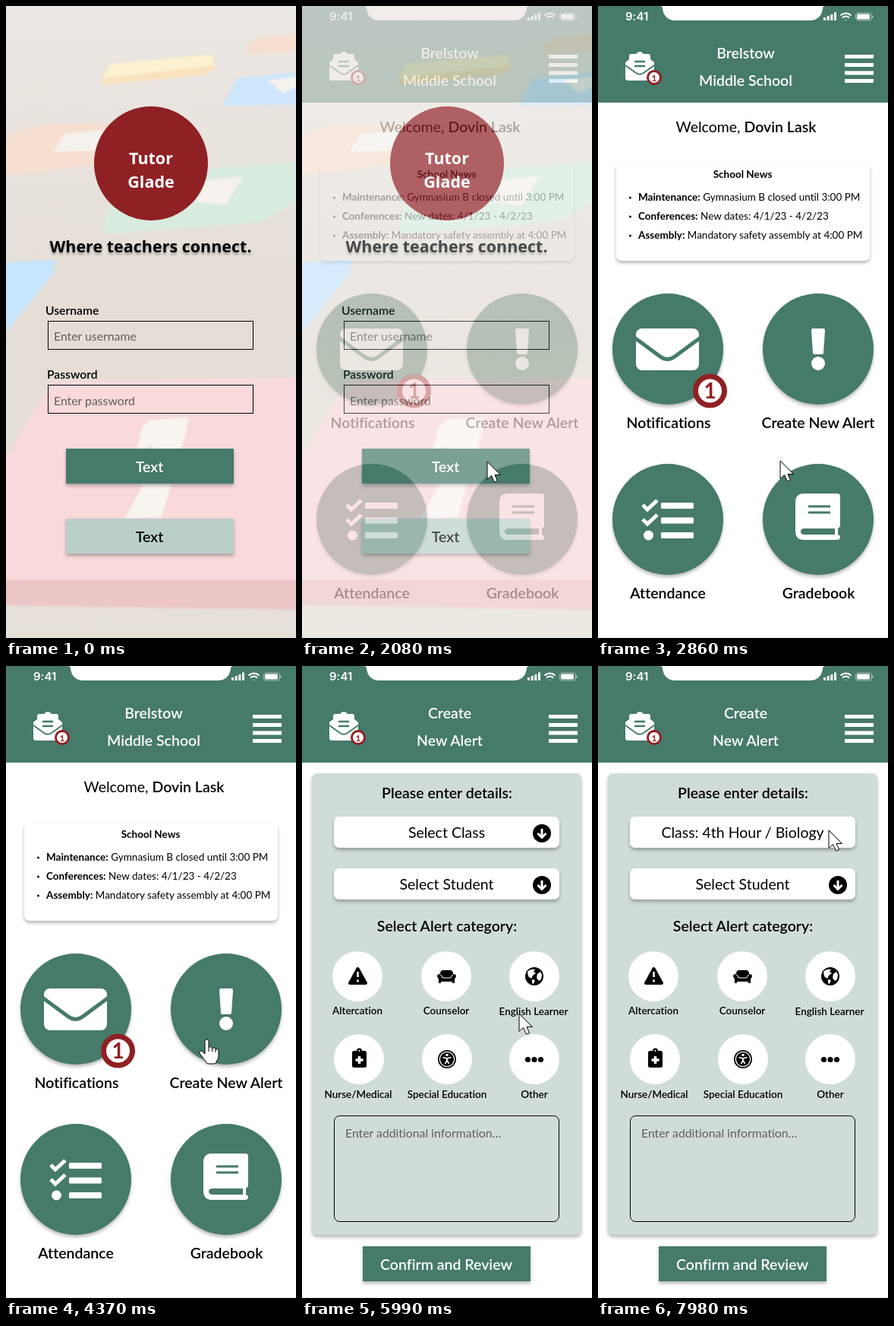
An HTML page that plays this animation: 382x831 px, repeating every 8 s.

```html
<!DOCTYPE html>
<html lang="en">
<head>
<meta charset="utf-8">
<title>School app walkthrough</title>
<style>
  html, body { margin: 0; width: 100%; height: 100%; overflow: hidden; background: #fff; }
  svg { display: block; width: 100vw; height: 100vh; }
  text { font-family: Lato, "Open Sans", sans-serif; font-size: 13.5px; font-variant-ligatures: none; }
  .mid { text-anchor: middle; }
  .semi { font-weight: 600; }
  .bold { font-weight: 700; }
  .big { font-size: 19.5px; }
  .brand { font-family: "Open Sans", "Noto Sans", sans-serif; font-size: 21.5px; font-weight: 700; }
  .field { font-size: 15.7px; }
  .hint { font-size: 15.8px; fill: #625e5c; }
  .time { font-family: Inter, sans-serif; font-size: 15px; font-weight: 600; }
  .green { fill: #467a6a; }
  .white { fill: #fff; }
  .red { fill: #8f2023; }
  .box { fill: none; stroke: #000; }
  .cut { fill: none; stroke: #467a6a; }
  .raised { filter: drop-shadow(0 3px 2px rgba(0, 0, 0, .28)); }
</style>
</head>
<body>
<svg viewBox="0 0 382 831" preserveAspectRatio="none">
  <defs>
    <linearGradient id="ground" x2="0" y2="1">
      <stop stop-color="#ebe7e3"/>
      <stop offset=".5" stop-color="#e4ddd6"/>
      <stop offset="1" stop-color="#e5e0d8"/>
    </linearGradient>
    <filter id="soft"><feGaussianBlur stdDeviation="1.2"/></filter>

    <g id="top">
      <rect class="green" width="382" height="127"/>
      <path class="white" d="M81 0Q85 0 85 3C86 13 92 19 102 19H279C289 19 295 13 296 3Q296 0 300 0Z"/>
      <g class="white">
        <text class="time" x="36" y="19">9:41</text>
        <path d="M297 15h3v4h-3zM301.700 13h3v6h-3zM306.300 11h3v8h-3zM311 8.500h3v10.500h-3z"/>
        <rect x="341" y="10.500" width="17" height="7" rx="1.500"/>
        <path d="M361.500 12v4q2-2 0-4"/>
        <path d="M36 74L50 63Q55 57 60 63L74 74V95Q74 98 70 98H40Q36 98 36 95Z"/>
        <rect x="41" y="63" width="28" height="22" rx="3"/>
        <path d="M325 64h38v5h-38zM325 75h38v5h-38zM325 85.500h38v5h-38zM325 96h38v5h-38z"/>
      </g>
      <g fill="none" stroke="#fff">
        <rect x="339.500" y="9" width="21" height="10" rx="3" opacity=".5"/>
        <path d="M319.500 12.500Q326.500 6.500 333.500 12.500M322 15.500Q326.500 11.500 331 15.500" stroke-width="2"/>
        <path d="M326.500 18v.5" stroke-width="3"/>
      </g>
      <path class="cut" stroke-width="2" d="M36 78L50 88Q55 91.500 60 88L74 78"/>
      <path class="cut" stroke-width="2.500" d="M48 73H62M48 79H62"/>
      <circle cx="74" cy="94" r="8.500" fill="#fff" stroke="#8f2023" stroke-width="3"/>
      <text class="mid bold red" x="74" y="98.500" style="font-size:12px">1</text>
    </g>
    <g id="down">
      <circle r="12"/>
      <path d="M0-6V5M-5.500 0L0 5.500L5.500 0" fill="none" stroke="#fff" stroke-width="3"/>
    </g>
  </defs>

  <g id="login">
    <rect width="382" height="831" fill="url(#ground)"/>
    <g filter="url(#soft)">
      <path fill="#f9e2bd" d="M127 86L275 74V82L262 90L128 104Z"/>
      <path fill="#fcf1d0" d="M137 76L272 64L274 78L128 95Z"/>
      <path fill="#f6dfd0" d="M317 52L332 42L385 36V58L318 65ZM-5 172L45 156L160 155L135 207L-5 223Z"/>
      <path fill="#cde6fb" d="M304 95L385 87V129L285 132Z"/>
      <path fill="#d8ebdf" d="M150 222L385 205V256L335 284L130 300V281Z"/>
      <path fill="#c6e5fd" d="M-5 337L66 334L62 352L-5 435Z"/>
      <path fill="#f5f2ee" d="M78 168L130 163L118 190L62 192ZM345 98L385 92V104L365 115ZM265 229L312 224L290 262L250 258Z"/>
      <path fill="#f9d9db" d="M62 492L385 489V758H-5V602Z"/>
      <path fill="#ecc6c7" d="M-5 754H385V794L-5 788Z"/>
      <path fill="#f8f4f0" d="M180 553L191 544L241 541L237 560L205 672L157 674L180 630L194 578L172 584Z"/>
    </g>
    <circle class="red" cx="191" cy="207" r="75"/>
    <g class="mid">
      <text class="white brand" x="191" y="208">Tutor</text>
      <text class="white brand" x="191" y="239">Glade</text>
      <text class="brand" x="190.500" y="324" style="text-shadow:0 3px 3px rgba(0,0,0,.3)">Where teachers connect.</text>
    </g>
    <text class="field semi" x="52" y="406">Username</text>
    <text class="field semi" x="54" y="490">Password</text>
    <rect class="box" x="55.500" y="414.500" width="270" height="37"/>
    <rect class="box" x="55.500" y="498.500" width="270" height="37"/>
    <text class="hint" x="63" y="440">Enter username</text>
    <text class="hint" x="63" y="525">Enter password</text>
    <rect class="green raised" x="79" y="582" width="221" height="46"/>
    <rect class="raised" x="79" y="674" width="221" height="46" fill="#bcd0ca"/>
    <g class="mid semi">
      <text class="big white" x="189" y="613">Text</text>
      <text class="big" x="189" y="705">Text</text>
    </g>
  </g>

  <g id="home">
    <rect class="white" width="382" height="831"/>
    <rect y="830" width="382" height="1" fill="#eee"/>
    <use href="#top"/>
    <g class="mid semi white">
      <text class="big" x="194.500" y="69">Brelstow</text>
      <text class="big" x="194.500" y="105">Middle School</text>
    </g>
    <text class="big mid" x="195" y="166">Welcome, <tspan class="semi">Dovin Lask</tspan></text>
    <rect class="white raised" x="24" y="206" width="334" height="129" rx="7"/>
    <text class="mid bold" x="190.500" y="226">School News</text>
    <circle cx="42.500" cy="252" r="1.500"/>
    <circle cx="42.500" cy="277" r="1.500"/>
    <circle cx="42.500" cy="302" r="1.500"/>
    <text x="53" y="256"><tspan class="bold">Maintenance:</tspan> Gymnasium B closed until 3:00 PM</text>
    <text x="53" y="281"><tspan class="bold">Conferences:</tspan> New dates: 4/1/23 - 4/2/23</text>
    <text x="53" y="306"><tspan class="bold">Assembly:</tspan> Mandatory safety assembly at 4:00 PM</text>

    <g class="green raised">
      <circle cx="92" cy="451" r="73"/>
      <circle cx="290" cy="451" r="73"/>
      <circle cx="92" cy="675" r="73"/>
      <circle cx="290" cy="675" r="73"/>
    </g>
    <g class="white">
      <rect x="50" y="424" width="83" height="55" rx="8"/>
      <path d="M283 424H297Q299 424 299 427L297 456Q297 458 295 458H285Q283 458 283 456L281 427Q281 424 283 424Z"/>
      <circle cx="290" cy="470" r="9"/>
      <circle cx="66.500" cy="696" r="6.500"/>
      <rect x="83" y="653" width="43" height="8" rx="1.500"/>
      <rect x="83" y="672.500" width="43" height="8" rx="1.500"/>
      <rect x="83" y="692" width="43" height="8" rx="1.500"/>
      <path d="M271 641H315Q319 641 319 645V683Q319 685 316 687V695Q319 696 319 698Q319 702 315 702H271Q260 702 260 690V653Q260 641 271 641Z"/>
    </g>
    <path class="cut" stroke-width="5" d="M48 436L82 461Q91.500 468 101 461L135 436"/>
    <path class="cut" stroke-width="3" d="M277 658H306M277 666H306"/>
    <path class="green" d="M271 687H312V695H271Q267 694.500 267 691T271 687Z"/>
    <path fill="none" stroke="#fff" stroke-width="5" d="M59 656L65 662L78 650M59 675L65 681L78 669"/>
    <circle cx="147.500" cy="506" r="19" fill="#fff" stroke="#8f2023" stroke-width="7"/>
    <text class="mid bold red" x="147.500" y="516" style="font-size:28px">1</text>
    <g class="mid semi">
      <text class="big" x="93" y="555">Notifications</text>
      <text class="big" x="290" y="555">Create New Alert</text>
      <text class="big" x="92" y="779">Attendance</text>
      <text class="big" x="290.500" y="779">Gradebook</text>
    </g>
  </g>

  <g id="form">
    <rect class="white" width="382" height="831"/>
    <rect y="830" width="382" height="1" fill="#eee"/>
    <use href="#top"/>
    <g class="mid semi white">
      <text class="big" x="194.500" y="69">Create</text>
      <text class="big" x="194.500" y="105">New Alert</text>
    </g>
    <rect class="raised" x="13" y="141" width="355" height="607" rx="7" fill="#d0dcd8"/>
    <rect class="white raised" x="42" y="198" width="297" height="41" rx="7"/>
    <rect class="white raised" x="42" y="266" width="297" height="41" rx="7"/>
    <g class="mid">
      <text class="big semi" x="191" y="174">Please enter details:</text>
      <text class="big" x="190.500" y="226">Select Class</text>
      <text class="big" x="190.500" y="294">Select Student</text>
      <text class="big semi" x="191" y="349">Select Alert category:</text>
    </g>
    <use href="#down" x="316" y="220"/>
    <use href="#down" x="316" y="288"/>
    <g id="picked">
      <rect class="white" x="42" y="198" width="297" height="41" rx="7"/>
      <text class="big mid" x="190.500" y="226">Class: 4th Hour / Biology</text>
    </g>
    <g class="white">
      <circle cx="73" cy="408" r="33"/>
      <circle cx="190" cy="408" r="33"/>
      <circle cx="306" cy="408" r="33"/>
      <circle cx="75" cy="517" r="33"/>
      <circle cx="191" cy="517" r="33"/>
      <circle cx="306" cy="517" r="33"/>
    </g>
    <g class="mid semi">
      <text x="73" y="458">Altercation</text>
      <text x="190" y="458">Counselor</text>
      <text x="305" y="459">English Learner</text>
      <text x="74" y="568">Nurse/Medical</text>
      <text x="191" y="568">Special Education</text>
      <text x="306" y="568">Other</text>
    </g>

    <path d="M73.500 398L84 417H63Z" stroke="#000" stroke-width="4" stroke-linejoin="round"/>
    <path d="M73.500 402V409M73.500 412.500V415.500" stroke="#fff" stroke-width="2.500"/>
    <path d="M182 405Q182 400 186 400H195Q199 400 199 405Q203 405 203 408L201 412V417H198V415H183V417H180V412L178 408Q178 405 182 405Z"/>
    <path d="M182 406Q185 407 185 410H196Q196 407 199 406" fill="none" stroke="#fff"/>
    <circle cx="306" cy="408" r="12"/>
    <path class="white" d="M297 402Q301 398 307 399L305 402L308 404L304 407L302 411L298 408ZM310 405L314 402L316 406L315 412L312 414L309 410ZM303 412L307 413L305 418L303 417Z"/>
    <rect x="66" y="506" width="19" height="22" rx="2.500"/>
    <circle cx="75.500" cy="506" r="3.500"/>
    <path d="M75.500 513V523M70.500 518H80.500" stroke="#fff" stroke-width="3.500"/>
    <circle cx="75.500" cy="506" r="1" class="white"/>
    <circle cx="191" cy="517" r="12"/>
    <circle cx="191" cy="517" r="9.700" fill="none" stroke="#fff" stroke-width="1.300"/>
    <circle cx="191" cy="511.500" r="1.800" class="white"/>
    <path d="M185.500 514.500L191 516L196.500 514.500M191 516V518.500L188.500 523M191 518.500L193.500 523" fill="none" stroke="#fff" stroke-width="1.800"/>
    <circle cx="297.500" cy="517.500" r="3.600"/>
    <circle cx="306" cy="517.500" r="3.600"/>
    <circle cx="314.500" cy="517.500" r="3.600"/>

    <rect class="box" x="42.500" y="591.500" width="296" height="139" rx="7"/>
    <text class="hint" x="57" y="620">Enter additional information…</text>
    <rect class="green raised" x="80" y="763" width="221" height="46"/>
    <text class="big mid semi white" x="190" y="794">Confirm and Review</text>
  </g>

  <g id="cursor" fill="#fff" stroke="#000" stroke-linejoin="round">
    <path id="arrow" d="M0 0V23.500L5.500 18.500L9.500 27L13.500 25.500L10 17.500H17.500Z"/>
    <g id="hand">
      <path d="M-2 2.500C-2-.5 3-.5 3 2.500V11C4 9 7.500 9.500 7.500 12C9 10 12 11 12 13.500C14 12 16 13.500 16 16V22C16 26 13.500 27 13 30Q12 32 10 32H2Q0 32-1 29L-8.500 19C-10.500 16-7 14-5 16L-2 19Z"/>
      <path fill="none" d="M3 11V16M7.500 12V16M12 13.500V17"/>
    </g>
  </g>
</svg>

<script>
const LOOP = 8000, STEP = 70;
const $ = id => document.getElementById(id);

// Cursor moves as [time, x, y]; it rests between them.
const moves = [
  [[190, 372, 800], [400, 333, 735], [750, 268, 622], [960, 249, 609], [1030, 246, 603], [1100, 244, 599]],
  [[2860, 240, 598], [3210, 221, 593]],
  [[3810, 222, 590], [4370, 264, 491], [4580, 281, 461], [4650, 282, 459]],
  [[5990, 286, 457], [6400, 318, 330], [6750, 341, 202]],
  [[6820, 342, 198], [7030, 322, 195], [7300, 297, 212], [7400, 298, 220], [7570, 304, 216]]
];

const clamp = v => Math.min(1, Math.max(0, v));
const fade = (t, from, to) => {
  const k = clamp((t - from) / (to - from));
  return k * k * (3 - 2 * k);
};

function cursorAt(t) {
  const path = moves.filter(m => m[0][0] <= t).pop();
  if (!path) return null;
  const start = path[0][0];
  const now = start + Math.floor((t - start) / STEP) * STEP;
  const next = path.findIndex(p => p[0] > now);
  if (next < 0) return path[path.length - 1].slice(1);
  const [t0, x0, y0] = path[next - 1], [t1, x1, y1] = path[next];
  const k = (now - t0) / (t1 - t0);
  return [x0 + (x1 - x0) * k, y0 + (y1 - y0) * k];
}

const inBox = (x, y, l, t, r, b) => x >= l && x <= r && y >= t && y <= b;

function isOverLink(t, x, y) {
  if (t < 1880) return inBox(x, y, 79, 582, 300, 628);
  if (t < 5200) return [451, 675].some(cy => Math.hypot(x - 290, y - cy) < 73);
  return t < 7640 && inBox(x, y, 42, 198, 339, 239);
}

function show(id, opacity) {
  $(id).style.opacity = opacity;
  $(id).style.display = opacity ? "" : "none";
}

function draw(ms) {
  const t = ms % LOOP;
  show("home", fade(t, 1940, 2340));
  show("form", fade(t, 5150, 5400));
  show("picked", fade(t, 7600, 7950));
  const pos = cursorAt(t);
  show("cursor", pos ? 1 : 0);
  if (pos) {
    const over = isOverLink(t, ...pos);
    $("cursor").setAttribute("transform", `translate(${pos})`);
    show("hand", over ? 1 : 0);
    show("arrow", over ? 0 : 1);
  }
}

const begin = performance.now();
function tick() {
  draw(performance.now() - begin);
  requestAnimationFrame(tick);
}
tick();
</script>
</body>
</html>
```
